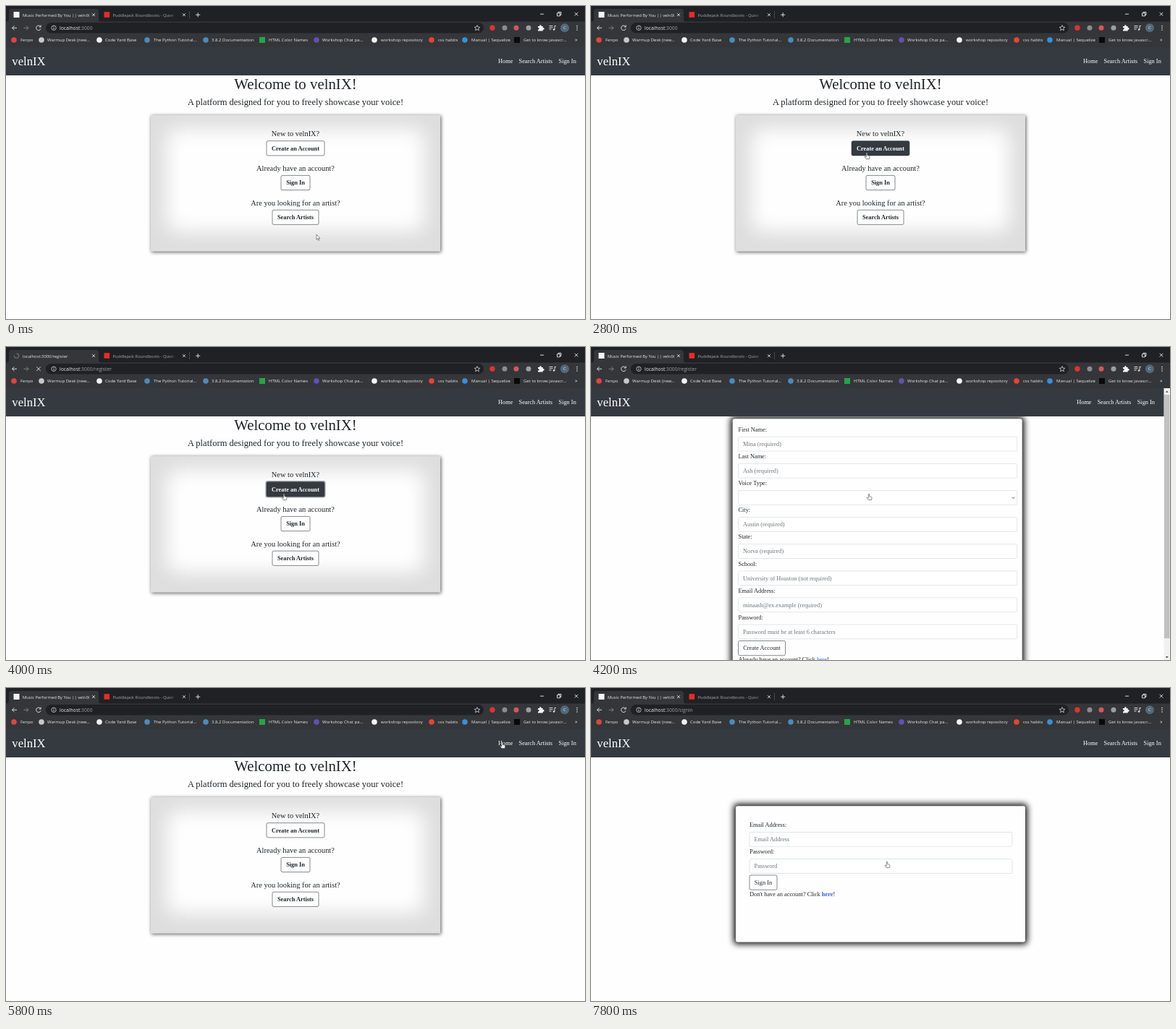
An HTML page for the animation above (8 s loop, 800 by 433 pixels).

```html
<!DOCTYPE html>
<html lang="en">
<head>
<meta charset="utf-8">
<title>velnIX</title>
<style>
  html, body { margin: 0; width: 100%; height: 100%; overflow: hidden; background: #fefefe; }
  svg { display: block; width: 100%; height: 100%; }
  text { font: 8.33px "Liberation Serif", "Times New Roman", serif; fill: #212529; white-space: pre; }
  .ui { font: 6px "Open Sans", "Noto Sans", sans-serif; fill: #e8eaed; }
  .line { fill: none; stroke: #e8eaed; stroke-width: .9; }
  .dim { stroke: #85888c; }
  .mid { text-anchor: middle; }
  .nav text { fill: #fff; }
  .hint { fill: #6c757d; }
  .field { fill: #fff; stroke: #ced4da; stroke-width: .6; }
  .btn .face { fill: #fff; stroke: #343a40; stroke-width: .6; }
  .btn .halo { fill: #a3a7a8; visibility: hidden; }
  .btn.hot .face { fill: #343a40; }
  .btn.hot text { fill: #fff; }
  .btn.ring .halo { visibility: inherit; }
  .bold { font-weight: bold; }
  .link { fill: #2f62d9; }
</style>
</head>
<body>
<svg id="stage" viewBox="0 0 800 433" preserveAspectRatio="none"></svg>
<script>
const LOOP = 8000, STEP = 200, SITE = "velnIX", HOST = "localhost:3000";

const text = (x, y, str, cls = "", size = 0, id = "") =>
  `<text x="${x}" y="${y}" class="${cls}"${size ? ` style="font-size:${size}px"` : ""}${id ? ` id="${id}"` : ""}>${str}</text>`;
const rect = (x, y, w, h, fill, more = "") =>
  `<rect x="${x}" y="${y}" width="${w}" height="${h}" fill="${fill}" ${more}/>`;
const dot = (x, y, r, fill) => `<circle cx="${x}" cy="${y}" r="${r}" fill="${fill}"/>`;
const line = (d, more = "") => `<path class="line" d="${d}" ${more}/>`;
const group = (id, body, more = "") => `<g id="${id}" ${more}>${body}</g>`;
const cross = (x, y, r) => line(`M${x - r} ${y - r}l${2 * r} ${2 * r}m0 ${-2 * r}l${-2 * r} ${2 * r}`);

const button = (id, x, y, w, label, bold = "") => group(id,
  rect(x - 1.6, y - 1.6, w + 3.2, 23.4, "", 'rx="3" class="halo"') +
  rect(x, y, w, 20.2, "", 'rx="2" class="face"') +
  text(x + w / 2, y + 12.9, label, "mid " + bold), 'class="btn"');

const field = (x, y, w, label, hint) =>
  text(x, y, label) + rect(x, y + 7.3, w, 19.8, "", 'rx="2" class="field"') +
  text(x + 6.5, y + 20, hint, "hint");

const panel = (x, y, w, h) =>
  rect(x - 3, y - 3, w + 6, h + 6, "#111", 'rx="5" style="filter:blur(4.5px)"') +
  rect(x, y, w, h, "#fefefe", 'rx="3"');

function browser() {
  const bookmarks = [
    [11, "#d9483f", 20, "Fenpo"], [49, "#c5c9cf", 57, "Warmup Desk (new..."],
    [129, "#f1f3f4", 137, "Code Yard Base"], [195, "#4b8bbe", 204, "The Python Tutorial..."],
    [276, "#4b8bbe", 284, "3.8.2 Documentation"], [354, "#27a34a", 363, "HTML Color Names", 1],
    [429, "#6350b5", 437, "Workshop Chat pa..."], [509, "#f5f5f5", 518, "workshop repository"],
    [588, "#e2472f", 597, "css habits"], [634, "#3b8fd6", 643, "Manual | Sequelize"],
    [706, "#0a0a0a", 715, "Get to know javascr...", 1]
  ].map(([ix, color, x, label, square]) =>
    (square ? rect(ix - 4, 43, 8, 8, color) : dot(ix, 47, 3.8, color)) + text(x, 49.3, label, "ui")).join("");

  const tabs =
    rect(0, 0, 800, 22, "#202124") +
    `<path d="M0 22q4 0 4-4V8q0-4 4-4H124q4 0 4 4V18q0 4 4 4V57H0z" fill="#35363a"/>` +
    rect(0, 21.5, 800, 35.5, "#35363a") +
    group("favicon", rect(10.5, 8, 8, 8, "#f4f4f4")) +
    group("spinner", line("M14.5 9a3.2 3.2 0 1 1-3.2 3.2", 'style="stroke:#8c9095"')) +
    text(23, 14.6, "", "ui", 5.85, "title") + cross(121, 12.2, 1.9) +
    rect(135.5, 8.2, 7.6, 7.6, "#e52d27") +
    `<text x="147.5" y="14.6" class="ui" style="font-size:5.85px;fill:url(#fade)">Puddlejack Roundboots - Quiet</text>` +
    cross(246, 12.2, 1.9) + rect(253.3, 7, .6, 10, "#5f6368") + line("M262.2 12.2h6m-3-3v6") +
    line("M738 11.2h5M761.5 9.8h4v4h-4zM763 9.8v-1.4h4v4h-1.4") + cross(788, 11.2, 2.3);

  const toolbar =
    line("M15 30.3H8.5m3-3l-3 3l3 3") + line("M24.5 30.3H31m-3-3l3 3l-3 3", 'style="stroke:#85888c"') +
    group("reload", line("M47.8 28.6a3.3 3.3 0 1 0 .3 2.8M48.2 26.5v2.5h-2.5")) +
    group("stop", cross(45, 30.3, 2.8)) +
    rect(55, 23, 605, 14.6, "#202124", 'rx="7.3"') +
    `<circle class="line" cx="66" cy="30.3" r="3.2" style="stroke-width:.7"/>` + line("M66 29.8v2.3M66 28.2v.8") +
    `<text x="74" y="32.8" class="ui" style="font-size:6.75px">localhost<tspan id="path" fill="#9aa0a6"></tspan></text>` +
    line("M651 26.6l1.1 2.5 2.7.2-2.1 1.8.7 2.7-2.4-1.5-2.4 1.5.7-2.7-2.1-1.8 2.7-.2z", 'style="stroke-width:.7"') +
    dot(672, 30.3, 3.7, "#d9362f") + dot(689, 30.3, 3.5, "#8a8d90") +
    dot(705, 30.3, 3.5, "#d4575c") + dot(722, 30.3, 3.5, "#9b9ea2") +
    `<path d="M735 28h2.2a1.3 1.3 0 1 1 2.4 0h2.2v2.2a1.3 1.3 0 1 1 0 2.4v2H735v-2.2a1.2 1.2 0 1 0 0-2.2z" fill="#f1f3f4"/>` +
    line("M750.5 27.5h5M750.5 29.8h5M750.5 32.1h3M758 32.5v-5h2") + dot(757, 32.6, 1.2, "#e8eaed") +
    dot(772, 30.3, 6, "#52697b") + text(772, 32.4, "C", "ui mid") +
    [27.6, 30.3, 33].map(y => dot(789, y, .8, "#e8eaed")).join("");

  return tabs + toolbar + bookmarks + text(786, 49, "»", "ui", 7);
}

function homePage() {
  return text(400, 115, `Welcome to ${SITE}!`, "mid", 20.83) +
    text(400, 136.6, "A platform designed for you to freely showcase your voice!", "mid", 12.5) +
    rect(200, 151, 400, 188.5, "#dedede", 'style="filter:drop-shadow(1px 1.5px 2.5px #555)"') +
    `<g clip-path="url(#card)">${rect(222, 170, 356, 142, "#fefefe", 'rx="14" style="filter:blur(13px)"')}</g>` +
    text(400, 179.8, `New to ${SITE}?`, "mid", 10.42) +
    button("create", 360, 186.7, 80, "Create an Account", "bold") +
    text(400, 227.7, "Already have an account?", "mid", 10.42) +
    button("signinBtn", 380, 234.4, 40, "Sign In", "bold") +
    text(400, 275.6, "Are you looking for an artist?", "mid", 10.42) +
    button("search", 368, 282.2, 64, "Search Artists", "bold");
}

function registerPage() {
  const rows = [
    ["First Name:", "Mina (required)"], ["Last Name:", "Ash (required)"], ["Voice Type:", ""],
    ["City:", "Austin (required)"], ["State:", "Norva (required)"],
    ["School:", "University of Houston (not required)"],
    ["Email Address:", "minaash@ex.example (required)"],
    ["Password:", "Password must be at least 6 characters"]];
  return panel(195.7, 99.3, 400, 360) +
    rows.map(([label, hint], i) => field(203.5, 117 + 37.1 * i, 385.3, label, hint)).join("") +
    line("M581.4 207.6l2 2l2-2", 'style="stroke:#555"') +
    button("submit", 203.5, 406.5, 65, "Create Account") +
    text(203.5, 435.2, 'Already have an account? Click <tspan class="link">here</tspan>!');
}

function signinPage() {
  return panel(200, 163.3, 400, 188.3) +
    field(219, 192.2, 363, "Email Address:", "Email Address") +
    field(219, 229.3, 363, "Password:", "Password") +
    button("enter", 219, 259, 38, "Sign In") +
    text(219, 288.4, `Don't have an account? Click <tspan class="link bold">here</tspan>!`);
}

const navbar = rect(0, 56.6, 800, 39.4, "#343a40") + rect(0, 56.2, 800, .5, "#4a4c50") +
  text(8.3, 82.2, SITE, "", 16.67) +
  group("links", text(680, 79.3, "Home") + text(708.5, 79.3, "Search Artists") + text(763.5, 79.3, "Sign In"));

const scrollbar = rect(791.5, 57, 8.5, 376, "#f1f1f1") + rect(792, 66, 7.5, 337, "#c1c1c1") +
  `<path d="M793.8 62.8l2-2.4l2 2.4zM793.8 428l2 2.4l2-2.4z" fill="#505050"/>`;

const pointer = 'fill="#fff" stroke="#444" stroke-width=".6" stroke-linejoin="round"';
const cursors =
  `<path id="arrow" ${pointer} d="M0 0V7.2L1.6 5.7L2.7 8.3L3.8 7.8L2.7 5.3H4.9z"/>` +
  `<path id="hand" ${pointer} d="M-.7 .6q.7-1 1.4 0V3.6l2.6 .7q.8 .3.7 1.2L3.5 8.6H-.9L-3 5.6q.4-1 1.3-.3l1 .8z"/>`;

const stage = document.getElementById("stage");
stage.innerHTML =
  `<defs><clipPath id="card"><rect x="200" y="151" width="400" height="188.5"/></clipPath>
   <linearGradient id="fade" gradientUnits="userSpaceOnUse" x1="224" x2="238" y1="0" y2="0">
   <stop stop-color="#a6a9ad"/><stop offset="1" stop-color="#a6a9ad" stop-opacity="0"/></linearGradient></defs>` +
  rect(0, 0, 800, 433, "#fefefe") + group("home", homePage()) + group("register", registerPage()) +
  group("signin", signinPage()) + group("nav", navbar, 'class="nav"') + group("scroll", scrollbar) +
  browser() + group("cursor", cursors);

const el = id => document.getElementById(id);
const show = (id, on) => el(id).setAttribute("visibility", on ? "inherit" : "hidden");

// start time, page, address path, loading
const states = [
  [0, "home", "", false], [3800, "home", "/register", true], [4200, "register", "/register", false],
  [5800, "home", "", false], [7400, "home", "/signin", true], [7800, "signin", "/signin", false]];

// time, x, y of the pointer tip
const route = [
  [0, 429, 316], [400, 420, 326], [800, 340, 272], [1200, 272, 206], [1400, 270, 201],
  [1600, 290, 215], [2000, 328, 276], [2400, 345, 204], [2800, 381, 203], [3800, 384, 203],
  [4600, 384, 203], [5400, 685, 75], [6000, 686, 75], [6600, 520, 180], [7000, 412, 238],
  [7400, 409, 240], [8000, 409, 240]];

function pointerAt(t) {
  const i = route.findIndex(p => p[0] > t);
  const [t0, x0, y0] = route[i - 1], [t1, x1, y1] = route[i];
  const k = (t - t0) / (t1 - t0), e = k * k * (3 - 2 * k);
  return [x0 + (x1 - x0) * e, y0 + (y1 - y0) * e];
}

function draw(t) {
  const [, page, path, loading] = states.filter(s => s[0] <= t).pop();
  const [x, y] = pointerAt(t);
  const overCreate = t >= 2800 && t < 4200, overSignin = t >= 7000;
  for (const id of ["home", "register", "signin"]) show(id, id === page);
  show("scroll", page === "register");
  el("links").setAttribute("transform", `translate(${page === "register" ? -8.8 : 0})`);
  el("title").textContent = loading ? HOST + path : `Music Performed By You || ${SITE}`;
  el("path").textContent = ":3000" + path;
  show("spinner", loading);
  show("favicon", !loading);
  show("stop", loading);
  show("reload", !loading);
  el("create").classList.toggle("hot", overCreate);
  el("create").classList.toggle("ring", t >= 3600 && t < 4200);
  el("signinBtn").classList.toggle("hot", overSignin);
  el("signinBtn").classList.toggle("ring", t >= 7400);
  const hand = t >= 2800 && t < 4600 || t >= 5400 && t < 6200 || overSignin;
  show("hand", hand);
  show("arrow", !hand);
  el("cursor").setAttribute("transform", `translate(${x} ${y})`);
}

function tick() {
  const t = performance.now() % LOOP;
  draw(Math.floor(t / STEP) * STEP);
  requestAnimationFrame(tick);
}
tick();
</script>
</body>
</html>
```
